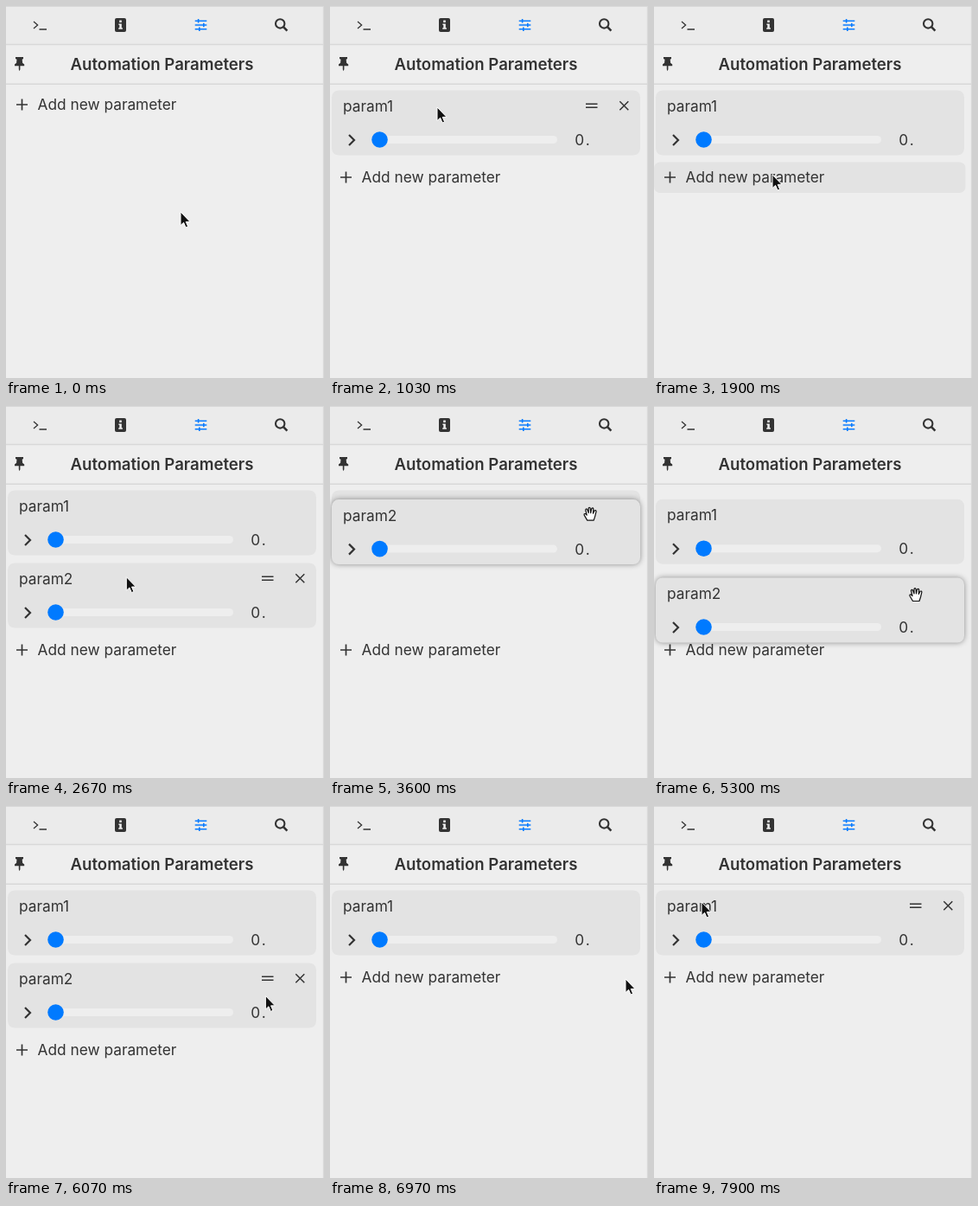
Animation of 368x430 px, one loop 8 s. Source, as an HTML page:

```html
<!DOCTYPE html>
<html lang="en">
<head>
<meta charset="utf-8">
<title>Automation Parameters</title>
<style>
  html, body { margin: 0; width: 100%; height: 100%; overflow: hidden; background: #eee; }
  svg { display: block; }
  text { font: 17.3px Inter, sans-serif; font-optical-sizing: none; fill: #333; }
  .title { font-size: 18.6px; font-weight: 600; text-anchor: middle; }
  .line { fill: none; stroke: #333; stroke-width: 1.5; }
  .rule { fill: none; stroke: #d8d8d8; stroke-width: 1.5; }
  .panel { fill: #e3e3e3; }
  .lifted .panel { filter: drop-shadow(0 0 3px rgba(0, 0, 0, .42)); }
</style>
</head>
<body>
<svg width="368" height="430" viewBox="0 0 368 430">
  <defs>
    <g id="cardBody">
      <path class="line" style="stroke-width:2.2" d="M22 51.5l6 6-6 6"/>
      <rect x="49" y="52.5" width="214" height="9" rx="4.5" fill="#eee"/>
      <circle cx="57.5" cy="57" r="9.3" fill="#007aff"/>
      <text x="283.3" y="63.7" letter-spacing="2">0.</text>
    </g>
    <g id="tools">
      <path class="line" d="M296 15.7h13.5M296 19.7h13.5"/>
      <path class="line" d="M335.3 12.8l10 10M345.3 12.8l-10 10"/>
    </g>
  </defs>

  <rect width="368" height="430" fill="#eee"/>
  <rect width="368" height="44" fill="#ebebeb"/>
  <path class="rule" d="M0 .2H368M0 44.5H368M0 90.3H368M367.6 0V430"/>

  <path class="line" style="stroke-width:1.3" d="M32 18l4.6 4-4.6 4M38.5 27h8.5"/>
  <rect x="126" y="14" width="13" height="16" rx="2" fill="#333"/>
  <path d="M131.2 16.6h2.6v2.4h-2.6zM130.4 20.4h3.4v4.8h1.1v1.6h-4.7v-1.6h1.1v-3.2h-.9z" fill="#eee"/>
  <path fill="none" stroke="#0a7cff" stroke-width="1.6"
        d="M218.7 17.2H232.3M218.7 22H232.3M218.7 26.8H232.3M222.6 15v4.4M228.8 19.8v4.4M223.8 24.6v4.4"/>
  <circle class="line" style="stroke-width:2.1" cx="317.2" cy="20.4" r="5.2"/>
  <path class="line" style="stroke-width:2.6" d="M321 24.2l4.4 4.4"/>
  <path fill="#333" d="M11 59h9v2l-1.3.8.4 4 2.1 1.7v1.8h-4.8v4l-.8 2-.8-2v-4H10v-1.8l2.1-1.7.4-4L11 61z"/>
  <text class="title" x="180.5" y="74.2">Automation Parameters</text>

  <g id="add">
    <rect id="addHover" class="panel" x="0" y="96.5" width="360.5" height="35.5" rx="7"/>
    <path class="line" style="stroke-width:1.7" d="M12 114h13M18.5 107.5v13"/>
    <text x="36.5" y="120">Add new parameter</text>
  </g>
  <g id="card1">
    <rect class="panel" x="2" width="357" height="75" rx="8"/>
    <text x="15" y="24.7">param1</text>
    <use href="#cardBody"/><use class="tools" href="#tools"/>
  </g>
  <g id="card2">
    <rect class="panel" x="2" width="357" height="75" rx="8"/>
    <text x="15" y="24.7">param2</text>
    <use href="#cardBody"/><use class="tools" href="#tools"/>
  </g>

  <path id="arrow" d="M0 0V15.6L3.6 12.3 6 18 8.6 16.9 6.2 11.4H11Z" fill="#111" stroke="#fff" stroke-width="1"/>
  <path id="hand" fill="#fff" stroke="#111" stroke-width="1.2" stroke-linejoin="round"
        d="M-3.5 7.5L-7 1.5Q-7.5-.5-5.5 0L-4 1.5-5.5-4.5Q-5-6.5-3.5-5L-2-1V-6.5Q-1-8.2 0-6.5L.5-1 1.5-6Q3-7.5 3.6-5.8L3.3-.5 5-3.8Q6.8-4.5 6.9-2.8L5.5 3 4 7.5Z"/>
</svg>
<script>
const LOOP = 8000, TOP = 97.5, STEP = 84, HEIGHT = 75;
const $ = id => document.getElementById(id);
const clamp = v => Math.max(0, Math.min(1, v));
const smooth = s => s * s * (3 - 2 * s);
const easeOut = s => 1 - (1 - s) ** 3;
const tween = (t, start, end, a, b, ease = smooth) =>
  a + (b - a) * ease(clamp((t - start) / (end - start)));
const within = (t, a, b) => t >= a && t < b;

// Pointer moves: start, end, target, optional bend point.
const moves = [
  [200, 700, [124, 117]],
  [1530, 1900, [137, 195]],
  [2630, 3200, [302, 198], [215, 286]],
  [3370, 3690, [301, 107.5]],
  [3970, 4500, [303, 117], [290, 168]],
  [4800, 5300, [303, 218]],
  [6030, 6500, [342, 200], [240, 253]],
  [7370, 7900, [55, 111], [220, 316]]
];

function pointerAt(t) {
  let from = [202, 238];
  for (const [start, end, to, bend] of moves) {
    if (t < start) break;
    const s = smooth(clamp((t - start) / (end - start)));
    const mid = bend || from.map((v, i) => (v + to[i]) / 2);
    from = from.map((v, i) => (1 - s) ** 2 * v + 2 * s * (1 - s) * mid[i] + s * s * to[i]);
  }
  return from;
}

function card1Top(t) {
  return t < 5200 ? tween(t, 3610, 3810, TOP, TOP + STEP, easeOut)
                  : tween(t, 5200, 5400, TOP + STEP, TOP, easeOut);
}

function card2Top(t, y) {
  const low = TOP + STEP;
  if (t < 3370) return low;
  if (t < 3690) return low + y - 198;
  if (t < 4800) return tween(t, 3690, 3830, low - 90.5, TOP);
  if (t < 5630) return TOP + y - 117;
  return tween(t, 5630, 5800, TOP + 101, low);
}

const show = (el, on) => { el.style.display = on ? "" : "none"; };
const place = (el, x, y) => el.setAttribute("transform", `translate(${x} ${y})`);

function drawCard(id, top, visible, y, canHover) {
  const card = $(id);
  show(card, visible);
  place(card, 0, top);
  show(card.querySelector(".tools"), canHover && y >= top && y <= top + HEIGHT);
}

function draw(t) {
  const [x, y] = pointerAt(t);
  const has1 = t >= 1030, has2 = within(t, 2270, 6970);
  const canHover = !within(t, 3370, 4400) && !within(t, 4800, 6030);
  drawCard("card1", card1Top(t), has1, y, canHover);
  drawCard("card2", card2Top(t, y), has2, y, canHover);
  $("card2").classList.toggle("lifted", within(t, 3370, 3830) || within(t, 4800, 5800));

  const shift = STEP * (has1 + has2);
  place($("add"), 0, shift);
  show($("addHover"), canHover && !within(t, 6970, 7030) && within(y - shift, 96.5, 132));

  const grabbing = within(t, 3200, 3970) || within(t, 4450, 5800);
  show($("hand"), grabbing);
  show($("arrow"), !grabbing);
  place($(grabbing ? "hand" : "arrow"), x, y);
}

const began = performance.now();
function frame() {
  draw((performance.now() - began) % LOOP);
  requestAnimationFrame(frame);
}
frame();
</script>
</body>
</html>
```
